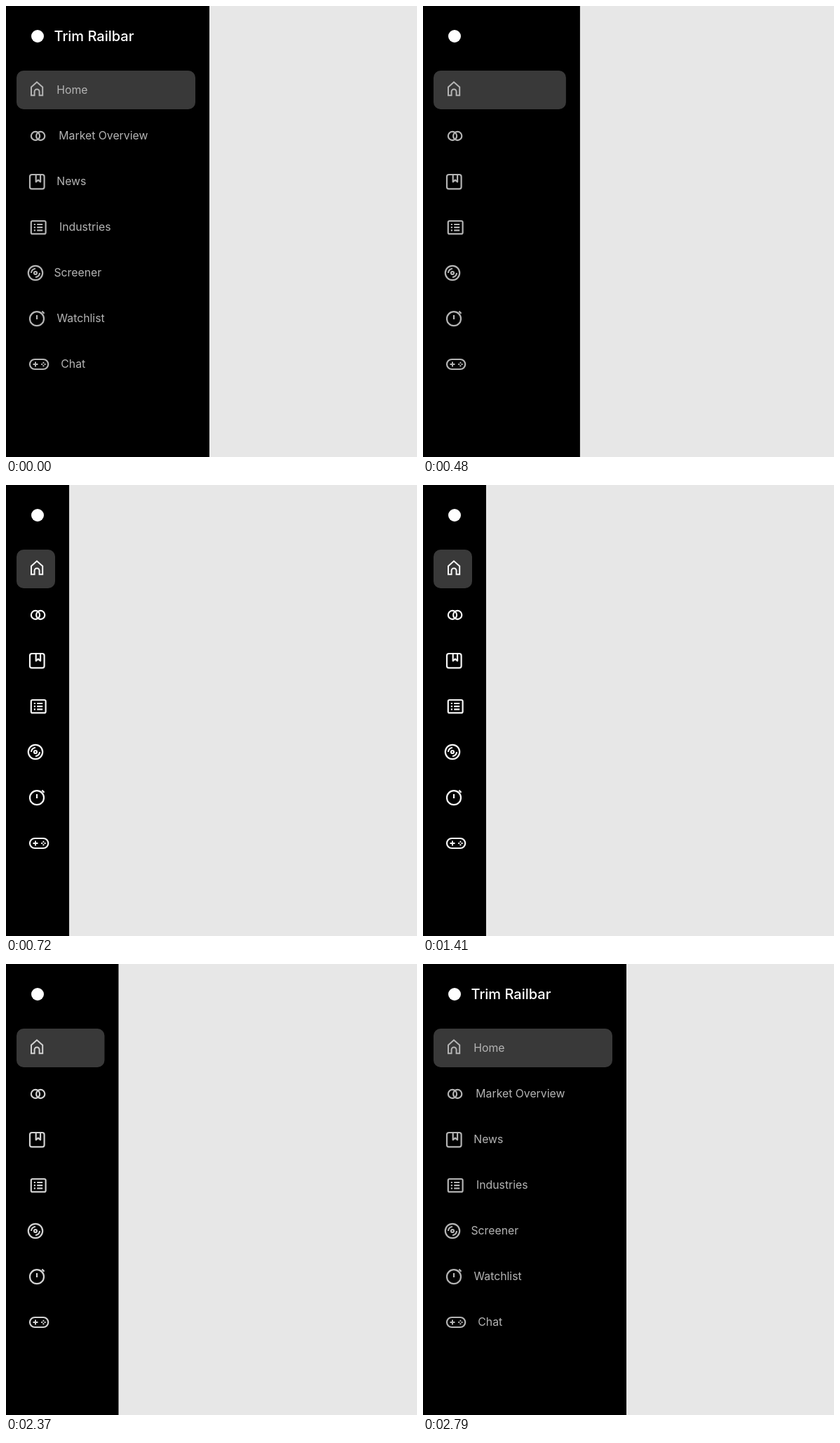
An HTML page for the animation above (2820 ms loop, 586 px wide and 642 px high).

```html
<!DOCTYPE html>
<html lang="en">
<head>
<meta charset="utf-8">
<title>Collapsing sidebar</title>
<style>
  html, body { margin: 0; width: 100%; height: 100%; overflow: hidden; background: #e7e7e7; }
  svg { display: block; }
  text { font-family: Inter, "Open Sans", sans-serif; }
  #labels { font-size: 15.8px; fill: #b4b4b4; }
  #title { font-size: 20px; font-weight: 500; fill: #fff; }
  #icons { fill: none; stroke-width: 2.2; stroke-linejoin: round; }
</style>
</head>
<body>
<svg width="586" height="642" viewBox="0 0 586 642">
  <rect width="586" height="642" fill="#e7e7e7"/>
  <rect id="bar" height="642" fill="#000"/>
  <rect id="pill" x="15" y="92" height="55" rx="10" fill="#393939"/>
  <circle cx="45" cy="43" r="9" fill="#fff"/>
  <g id="icons">
    <path stroke-width="2" stroke-linejoin="miter" d="M36 127.2V115.5L44 108.3L52.2 115.5V127.2H47.6V122a3.5 3.5 0 0 0-7 0V127.2Z"/>
    <g>
      <circle cx="42" cy="185" r="6.1"/>
      <circle cx="49.2" cy="185" r="6.1"/>
    </g>
    <g>
      <rect x="34" y="240" width="20.6" height="20.4" rx="3"/>
      <path d="M42.7 240v10.3l3.2-2.6 3.2 2.6V240"/>
    </g>
    <g>
      <rect x="35.8" y="306" width="20.8" height="18.4" rx="2"/>
      <path d="M39.8 311h2.2M44.2 311h8M39.8 315.2h2.2M44.2 315.2h8M39.8 319.4h2.2M44.2 319.4h8"/>
    </g>
    <g>
      <circle cx="42" cy="380" r="10.2"/>
      <circle cx="42" cy="380" r="2"/>
      <path d="M36 380a6 6 0 0 1 6-6M48 380a6 6 0 0 1-6 6"/>
    </g>
    <g>
      <circle cx="44" cy="445.2" r="10"/>
      <path d="M44 440v6M51.3 434.6l3.2 3.2"/>
    </g>
    <g>
      <rect x="34" y="503" width="26.2" height="14" rx="7"/>
      <path stroke-width="2" d="M38.5 510h7M42 506.5v7M50.2 510h2M54.6 510h2M52.4 507.8h2M52.4 512.2h2"/>
    </g>
  </g>
  <g id="words">
    <text id="title" x="68.5" y="49.5">Trim Railbar</text>
    <g id="labels"></g>
  </g>
</svg>
<script>
const LOOP = 2820, STEP = 30, OPEN = 290, CLOSED = 90;
const $ = id => document.getElementById(id);
const ramp = (t, from, to) => Math.min(1, Math.max(0, (t - from) / (to - from)));
const easeInOut = x => (1 - Math.cos(Math.PI * x)) / 2;

const items = [
  ["Home", 72.3], ["Market Overview", 75.3], ["News", 72.3], ["Industries", 76],
  ["Screener", 68.4], ["Watchlist", 72.5], ["Chat", 78.3]
];
items.forEach(([name, x], i) => {
  const label = document.createElementNS("http://www.w3.org/2000/svg", "text");
  label.setAttribute("x", x);
  label.setAttribute("y", 125.3 + 65 * i);
  label.textContent = name;
  $("labels").append(label);
});

function draw(time) {
  // The motion runs on a 30 ms beat.
  const t = Math.floor((time % LOOP) / STEP) * STEP;
  const closed = easeInOut(ramp(t, 324, 724)) - easeInOut(ramp(t, 2192, 2632));
  const shown = 1 - ramp(t, 180, 360) + ramp(t, 2570, 2760);
  const width = OPEN + (CLOSED - OPEN) * closed;
  const tone = Math.round(180 + 66 * ramp(closed, 0.4, 0.95));

  $("bar").setAttribute("width", width);
  $("pill").setAttribute("width", width - 35);
  $("words").setAttribute("opacity", shown);
  $("icons").setAttribute("stroke", `rgb(${tone},${tone},${tone})`);
}

const start = performance.now();
function tick() {
  draw(performance.now() - start);
  requestAnimationFrame(tick);
}
tick();
</script>
</body>
</html>
```
